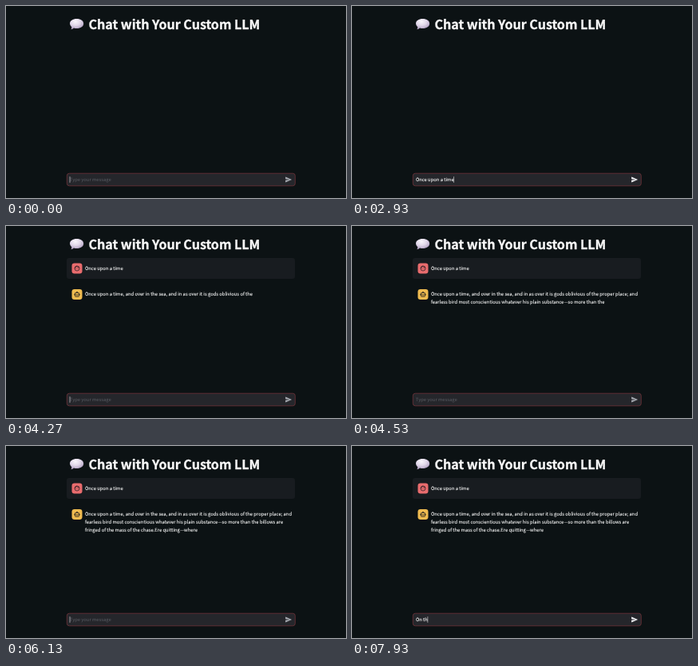
Write an HTML page that moves like this. It is 426x240 px and loops after 8000 ms.

```html
<!DOCTYPE html>
<html lang="en">
<head>
<meta charset="utf-8">
<title>Chat</title>
<style>
  html, body { margin: 0; width: 100%; height: 100%; overflow: hidden; background: #0c1214; }
  svg { display: block; width: 100vw; height: 100vh; }
  /* Text is laid out at ten times its size and scaled down, which keeps letter spacing even. */
  text {
    font: 58.2px "Noto Sans CJK JP", "Noto Sans CJK SC", "Noto Sans CJK KR", "Noto Sans CJK", "Noto Sans", sans-serif;
    fill: #fafafa;
    stroke: #fafafa;
    stroke-width: 1;
    white-space: pre;
    text-rendering: geometricPrecision;
  }
  .title { font-size: 161.8px; font-weight: 700; letter-spacing: -.005em; stroke-width: 3; }
  #hint { fill: #5a5c63; stroke: none; }
  .icon { fill: none; stroke: #14161b; stroke-width: 2; }
  .icon .solid { fill: #14161b; stroke: none; }
</style>
</head>
<body>
<svg viewBox="0 0 426 240">
  <defs>
    <radialGradient id="balloon" cx=".4" cy=".25" r=".8">
      <stop offset="0" stop-color="#faf7fc"/>
      <stop offset=".5" stop-color="#dfd5e8"/>
      <stop offset="1" stop-color="#a794b8"/>
    </radialGradient>
  </defs>

  <path fill="url(#balloon)" d="M88.6 16C93.6 16 97.2 18.5 97.2 22S93.6 28 88.6 28Q86.6 28 85 27.5Q83.500 29 81.300 29.200Q82.500 27.800 82.200 26.200Q80 24.500 80 22C80 18.500 83.600 16 88.600 16Z"/>
  <text class="title" transform="translate(103.5 29) scale(.1)">Chat with Your Custom LLM</text>

  <g id="user">
    <rect x="76" y="40" width="286" height="26" rx="3.2" fill="#181c20"/>
    <rect x="82.5" y="46.5" width="13" height="13" rx="3.2" fill="#e96c6e"/>
    <g class="icon" transform="translate(84.94 48.94) scale(.338)">
      <circle cx="12" cy="12" r="9"/>
      <path d="M3.5 11Q8.5 9 10.5 4Q14 9.5 20.5 8.5"/>
      <circle class="solid" cx="9" cy="13" r="1.3"/>
      <circle class="solid" cx="15" cy="13" r="1.3"/>
    </g>
    <text transform="translate(99 55.3) scale(.1)">Once upon a time</text>
  </g>

  <g id="bot">
    <rect x="82.5" y="79" width="13" height="13" rx="3.2" fill="#efbb50"/>
    <g class="icon" transform="translate(84.94 81.44) scale(.338)">
      <rect x="5" y="6" width="14" height="14" rx="1"/>
      <path d="M12 6V3M9 3.5H15M5 10.5H2.5V14.5H5M19 10.5H21.5V14.5H19M8 16H16"/>
      <circle class="solid" cx="9" cy="11.5" r="1.5"/>
      <circle class="solid" cx="15" cy="11.5" r="1.5"/>
    </g>
    <text class="line" transform="translate(99 86.5) scale(.1)"></text>
    <text class="line" transform="translate(99 96.9) scale(.1)"></text>
    <text class="line" transform="translate(99 107.3) scale(.1)"></text>
  </g>

  <rect x="76.3" y="209.2" width="286" height="15.6" rx="3" fill="#25262b" stroke="#84383f" stroke-width=".65"/>
  <text id="hint" transform="translate(79.9 219.2) scale(.1)">Type your message</text>
  <text id="typed" transform="translate(79.9 219.2) scale(.1)"></text>
  <rect id="caret" y="213.2" width=".6" height="7.6" fill="#e4e4e6"/>
  <path id="send" transform="translate(349.4 212.44) scale(.38)" d="M2 21L23 12L2 3V10L17 12L2 14Z"/>
</svg>
<script>
  const LOOP = 8000, SENT = 3200, USER_AT = 3270, REPLY_AT = 3930, REPLY_STEP = 66.7;
  const drafts = [
    { text: "Once upon a time", keys: [200, 400, 530, 670, 870, 1400, 1530, 1730, 1870, 2000, 2200, 2400, 2670, 2730, 2870, 2930] },
    { text: "On th", keys: [7330, 7470, 7600, 7800, 7930] }
  ];
  const blinks = [3470, 4000, 4530, 5130, 5600, 6130, 6670, 7200];
  const reply = [
    "Once upon a time, and over in the sea, and in as over it is gods oblivious of the proper place; and",
    "fearless bird most conscientious whatever his plain substance—so more than the billows are",
    "fringed of the mass of the chase.Ere quitting—where"
  ].map(line => line.split(" "));

  const byId = id => document.getElementById(id);
  const [user, bot, hint, typed, caret, send] = ["user", "bot", "hint", "typed", "caret", "send"].map(byId);
  const lines = document.querySelectorAll(".line");
  const show = (node, on) => node.setAttribute("visibility", on ? "visible" : "hidden");
  const passed = (times, t) => times.filter(at => at <= t).length;

  function drawReply(t) {
    const step = Math.floor((t - REPLY_AT) / REPLY_STEP + .02);
    let left = t < REPLY_AT ? 0 : Math.round(1.9 + 3.425 * step);
    reply.forEach((words, i) => {
      lines[i].textContent = words.slice(0, Math.max(0, left)).join(" ");
      left -= words.length;
    });
  }

  function drawInput(t) {
    const draft = drafts[t < SENT ? 0 : 1];
    const value = draft.text.slice(0, passed(draft.keys, t));
    typed.textContent = value;
    show(hint, !value);
    send.setAttribute("fill", value ? "#f2f3f5" : "#a9adb4");
    caret.setAttribute("x", 79.7 + (value ? typed.getComputedTextLength() / 10 : 0));
    show(caret, value || passed(blinks, t) % 2 === 0);
  }

  function frame() {
    const t = performance.now() % LOOP;
    show(user, t >= USER_AT);
    show(bot, t >= REPLY_AT);
    drawReply(t);
    drawInput(t);
    requestAnimationFrame(frame);
  }
  frame();
</script>
</body>
</html>
```
